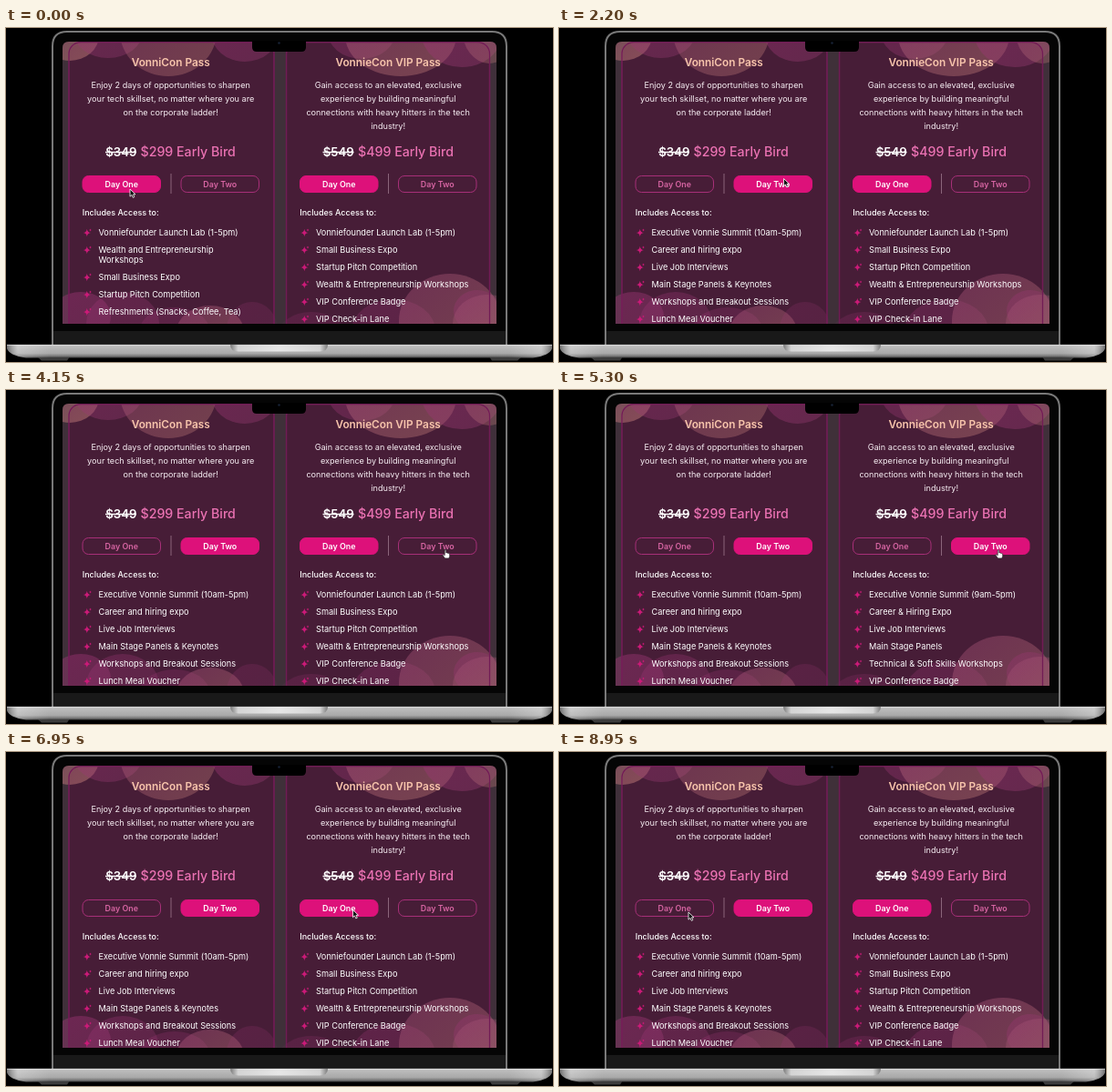
Animation, 600 px wide and 367 px high, one loop 9000 ms. Source, as an HTML page:

```html
<!DOCTYPE html>
<html lang="en">
<head>
<meta charset="utf-8">
<title>Pass comparison</title>
<style>
  html, body { margin: 0; width: 100%; height: 100%; overflow: hidden; background: #000; }
  svg { display: block; width: 100%; height: 100%; font-family: Inter, "Open Sans", sans-serif; }
  .title { font-size: 11.8px; font-weight: 600; fill: #f8c5ac; text-anchor: middle; }
  .intro { font-size: 9.13px; fill: #f8eff4; text-anchor: middle; }
  .price { font-size: 14.2px; font-weight: 500; fill: #eb72b3; }
  .old { font-size: 13.2px; font-weight: 600; fill: #fff; }
  .label { font-size: 9px; font-weight: 500; fill: #fff; }
  .item { font-size: 9.2px; fill: #fff; }
  .tab rect { fill: none; stroke: #a72f78; }
  .tab text { font-size: 8.9px; font-weight: 600; fill: #d765a3; text-anchor: middle; }
  .tab.on rect { fill: #dd117a; stroke: #dd117a; }
  .tab.on text { fill: #fff; }
</style>
</head>
<body>
<svg viewBox="0 0 600 367">
  <defs>
    <clipPath id="screen"><path d="M62 325V22q0-7 7-7H531q7 0 7 7V325Z"/></clipPath>
    <linearGradient id="blush" x2="1" y2="1">
      <stop stop-color="#b25482"/><stop offset="1" stop-color="#c98778"/>
    </linearGradient>
    <linearGradient id="berry" x2="1" y2="1">
      <stop stop-color="#a5347a"/><stop offset="1" stop-color="#8d3a6b"/>
    </linearGradient>
    <linearGradient id="metal" x2="0" y2="1">
      <stop stop-color="#c9c9c9"/><stop offset=".2" stop-color="#b9b9b9"/>
      <stop offset=".65" stop-color="#a9a9a9"/><stop offset=".85" stop-color="#7c7c7c"/><stop offset="1" stop-color="#3a3a3a"/>
    </linearGradient>
    <linearGradient id="ends">
      <stop stop-color="#000" stop-opacity=".4"/><stop offset=".02" stop-color="#fff" stop-opacity=".25"/>
      <stop offset=".08" stop-color="#fff" stop-opacity="0"/><stop offset=".92" stop-color="#fff" stop-opacity="0"/>
      <stop offset=".98" stop-color="#fff" stop-opacity=".25"/><stop offset="1" stop-color="#000" stop-opacity=".4"/>
    </linearGradient>
    <linearGradient id="lip">
      <stop stop-color="#7c7c7c"/><stop offset=".08" stop-color="#d4d4d4"/>
      <stop offset=".5" stop-color="#e6e6e6"/><stop offset=".92" stop-color="#d4d4d4"/><stop offset="1" stop-color="#7c7c7c"/>
    </linearGradient>
    <path id="spark" d="M-.7-4.300Q-.2-.4 3.500 0Q-.2.4-.7 4.300Q-1.200.4-4.700 0Q-1.200-.4-.7-4.300ZM3-4.500q.2 1.300 1.400 1.500q-1.200.2-1.400 1.500q-.2-1.300-1.400-1.500q1.200-.2 1.400-1.500Z" fill="#cb1a78"/>
  </defs>

  <rect width="600" height="367"/>
  <path d="M51 348V20Q51 4 67 4H533Q549 4 549 20V348" fill="#050505" stroke="#797979" stroke-width="2"/>
  <rect x="52" y="333" width="496" height="15" fill="#191919"/>
  <g clip-path="url(#screen)">
    <rect x="62" y="15" width="476" height="310" fill="#40303a"/>
    <g fill="#471d37" stroke="#701c55" stroke-width="1.300">
      <rect x="69" y="15.500" width="225" height="330" rx="13"/>
      <rect x="307.500" y="15.500" width="223" height="330" rx="13"/>
    </g>
    <g id="bubbles"></g>
    <rect x="294.700" y="15" width="12.200" height="310" fill="#40303a" opacity=".65"/>
    <g fill="none" stroke="#701c55" stroke-width="1.300">
      <rect x="69" y="15.500" width="225" height="330" rx="13"/>
      <rect x="307.500" y="15.500" width="223" height="330" rx="13"/>
    </g>
    <g id="content"></g>
  </g>
  <path d="M270 14h59v7q0 5-5 5H275q-5 0-5-5Z"/>
  <circle cx="299.500" cy="16.500" r="1.300" fill="#172235"/>

  <path d="M34 361h36l-3 4.500H39ZM530 361h36l-5 4.500H533Z" fill="#3c3c3c"/>
  <path d="M1 348H599V352Q596 360 578 362.500H22Q4 360 1 352Z" fill="url(#metal)"/>
  <path d="M1 348H599V352Q596 360 578 362.500H22Q4 360 1 352Z" fill="url(#ends)"/>
  <path d="M1 348.300H599" stroke="#e4e4e4" stroke-width=".7"/>
  <path d="M246 348H353Q353 355.500 344 355.500H255Q246 355.500 246 348Z" fill="url(#lip)"/>

  <g id="cursor">
    <path id="arrow" d="M0 0V8.200L1.900 6.400L3.300 9.400L4.800 8.700L3.500 5.800H6Z" fill="#111" stroke="#fff" stroke-width=".8"/>
    <path id="hand" d="M-.8.700Q0-.5.800.7V3.500Q1.700 2.900 2.200 3.800Q3.100 3.300 3.500 4.100Q4.700 3.900 4.700 5.300V6.900Q4.400 8.300 3.700 9.400H-.5Q-1.300 8.200-2.800 6.200Q-3.300 5-2.100 5L-.8 6.200Z" fill="#fff" stroke="#222" stroke-width=".7"/>
  </g>
</svg>
<script>
const LOOP = 9000;
const byId = id => document.getElementById(id);

function add(parent, tag, attrs, text) {
  const el = document.createElementNS("http://www.w3.org/2000/svg", tag);
  for (const key in attrs) el.setAttribute(key, attrs[key]);
  if (text) el.textContent = text;
  parent.appendChild(el);
  return el;
}

const write = (parent, cls, x, y, text) => add(parent, "text", { class: cls, x, y }, text);

// cx, cy, rx, ry, paint, opacity
const bubbles = [
  [70, 8, 32, 28, "blush", .48], [112, 4, 38, 29, "berry", .38],
  [178, 4, 53, 49, "blush", .34], [262, 5, 37, 32, "berry", .4],
  [390, 2, 38, 32, "berry", .35], [433, 8, 61, 45, "blush", .38],
  [500, 6, 44, 37, "berry", .42], [530, 0, 30, 39, "blush", .32],
  [82, 317, 33, 27, "berry", .42], [128, 325, 40, 35, "berry", .3],
  [185, 332, 38, 25, "berry", .24], [224, 334, 37, 29, "blush", .36],
  [270, 332, 28, 31, "berry", .2], [335, 339, 38, 27, "berry", .2],
  [425, 333, 46, 35, "berry", .26], [487, 322, 56, 52, "blush", .36],
  [517, 311, 26, 23, "berry", .3], [528, 325, 38, 32, "blush", .26]
];
for (const [cx, cy, rx, ry, paint, opacity] of bubbles)
  add(byId("bubbles"), "ellipse", { cx, cy, rx, ry, opacity, fill: `url(#${paint})` });

function makeList(parent, items) {
  const list = add(parent, "g", {});
  let y = 225;
  for (const item of items) {
    const lines = item.split("\n");
    add(list, "use", { href: "#spark", x: 89.5, y });
    lines.forEach((line, i) => write(list, "item", 101.5, y + 3.2 + i * 11, line));
    y += 19 + (lines.length - 1) * 11;
  }
  return list;
}

function makeTab(parent, x, label) {
  const tab = add(parent, "g", {});
  add(tab, "rect", { x, y: 162.5, width: 85.5, height: 18, rx: 6.5 });
  add(tab, "text", { x: x + 42.75, y: 174.5 }, label);
  return tab;
}

function makeCard(dx, { title, intro, old, price, days }) {
  const card = add(byId("content"), "g", { transform: `translate(${dx} 0)` });
  write(card, "title", 180.7, 41.6, title);
  intro.forEach((line, i) => write(card, "intro", 180.7, 66.4 + 15 * i, line));
  write(card, "old", 109.3, 141, old);
  add(card, "path", { d: "M109 136.500H143", stroke: "#fff", "stroke-width": 1.3 });
  write(card, "price", 147.5, 141, price);
  add(card, "path", { d: "M181 160V182", stroke: "#8b657b" });
  write(card, "label", 83.7, 206.2, "Includes Access to:");
  const tabs = [makeTab(card, 84, "Day One"), makeTab(card, 192, "Day Two")];
  const lists = days.map(items => makeList(card, items));
  return day => tabs.forEach((tab, i) => {
    tab.setAttribute("class", i === day ? "tab on" : "tab");
    lists[i].setAttribute("visibility", i === day ? "visible" : "hidden");
  });
}

const showBasic = makeCard(0, {
  title: "VonniCon Pass",
  intro: ["Enjoy 2 days of opportunities to sharpen", "your tech skillset, no matter where you are", "on the corporate ladder!"],
  old: "$349", price: "$299 Early Bird",
  days: [
    ["Vonniefounder Launch Lab (1-5pm)", "Wealth and Entrepreneurship\nWorkshops", "Small Business Expo",
      "Startup Pitch Competition", "Refreshments (Snacks, Coffee, Tea)"],
    ["Executive Vonnie Summit (10am-5pm)", "Career and hiring expo", "Live Job Interviews",
      "Main Stage Panels & Keynotes", "Workshops and Breakout Sessions", "Lunch Meal Voucher"]
  ]
});
const showVip = makeCard(238.5, {
  title: "VonnieCon VIP Pass",
  intro: ["Gain access to an elevated, exclusive", "experience by building meaningful", "connections with heavy hitters in the tech", "industry!"],
  old: "$549", price: "$499 Early Bird",
  days: [
    ["Vonniefounder Launch Lab (1-5pm)", "Small Business Expo", "Startup Pitch Competition",
      "Wealth & Entrepreneurship Workshops", "VIP Conference Badge", "VIP Check-in Lane"],
    ["Executive Vonnie Summit (9am-5pm)", "Career & Hiring Expo", "Live Job Interviews",
      "Main Stage Panels", "Technical & Soft Skills Workshops", "VIP Conference Badge"]
  ]
});

// time, x, y of the pointer tip
const path = [
  [0, 136, 177], [350, 136, 177], [1100, 246.5, 165.5], [2700, 246.5, 165.5],
  [3700, 482, 175.5], [5600, 482, 175.5], [6400, 380.5, 173.5],
  [7500, 380.5, 173.5], [8750, 142, 176], [9000, 142, 176]
];
const ease = u => (1 - Math.cos(Math.PI * u)) / 2;
const within = (v, a, b) => v >= a && v < b;

function pointer(t) {
  const i = path.findIndex(p => p[0] > t);
  const [t0, x0, y0] = path[i - 1], [t1, x1, y1] = path[i];
  const u = ease((t - t0) / (t1 - t0));
  return [x0 + (x1 - x0) * u, y0 + (y1 - y0) * u];
}

function draw(t) {
  const [x, y] = pointer(t);
  const hand = within(t, 850, 1750) || within(t, 3500, 5700);
  byId("cursor").setAttribute("transform", `translate(${x} ${y})`);
  byId("hand").setAttribute("visibility", hand ? "visible" : "hidden");
  byId("arrow").setAttribute("visibility", hand ? "hidden" : "visible");
  showBasic(t < 1700 ? 0 : 1);
  showVip(within(t, 4750, 6700) ? 1 : 0);
}

const start = performance.now();
function tick() {
  draw((performance.now() - start) % LOOP);
  requestAnimationFrame(tick);
}
tick();
</script>
</body>
</html>
```
